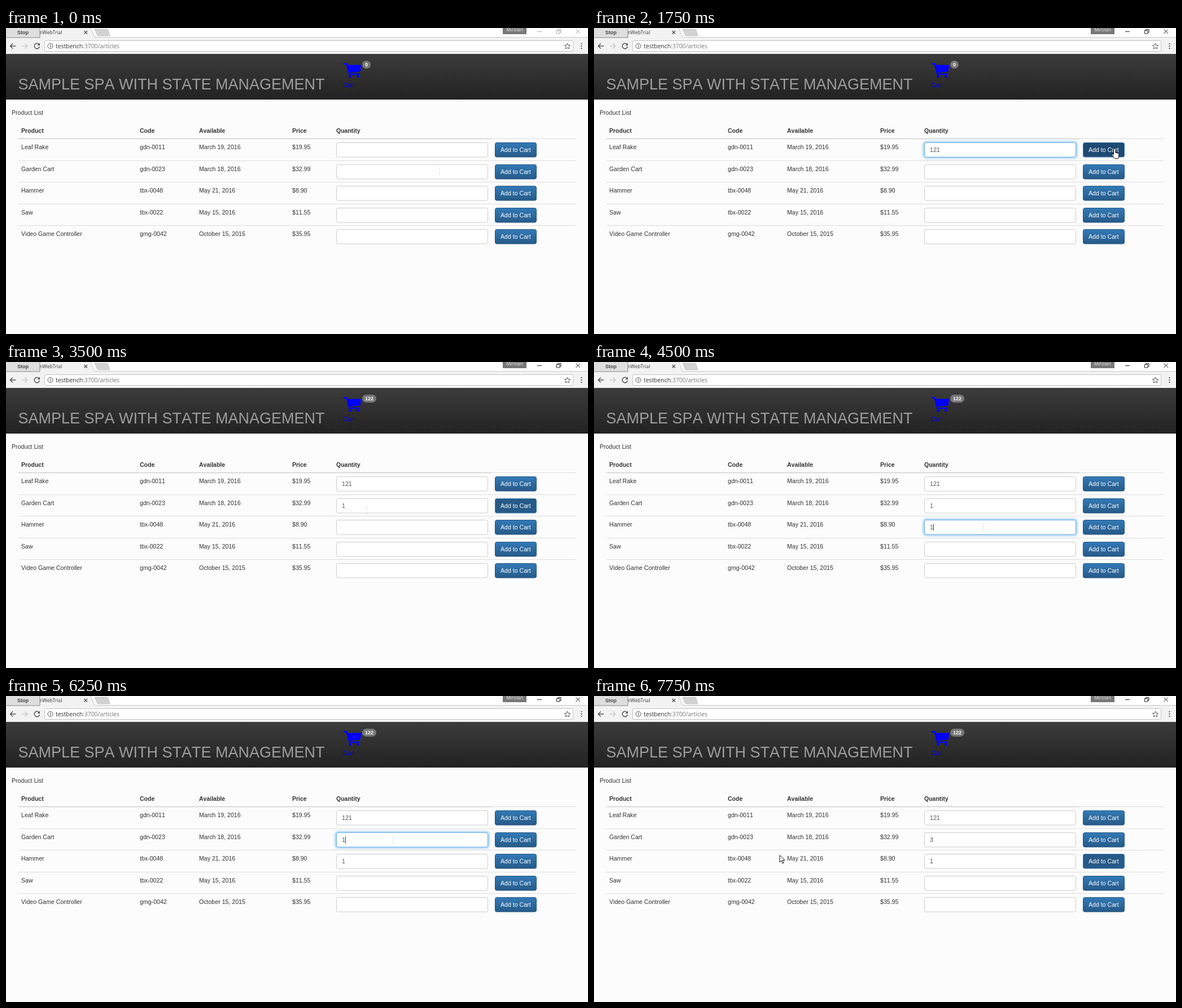
Animation of 1031x543 px, one loop 8 s. Source, as an HTML page:

```html
<!DOCTYPE html>
<html lang="en">
<head>
<meta charset="utf-8">
<title>Product list</title>
<style>
html, body { margin: 0; width: 100%; height: 100%; overflow: hidden; background: #fcfcfc; }
svg { display: block; font: 10.6px "Liberation Sans", Arial, sans-serif; font-kerning: none; fill: #333; }
.ui { font-family: "Open Sans", sans-serif; }
.b { font-weight: bold; font-size: 10.5px; }
.line { fill: none; stroke: #555; stroke-width: 1.5; }
.rule { fill: none; stroke: #ddd; }
</style>
</head>
<body>
<svg width="1031" height="543" viewBox="0 0 1031 543">
  <defs>
    <linearGradient id="bar" x2="0" y2="1"><stop stop-color="#3c3c3c"/><stop offset="1" stop-color="#222"/></linearGradient>
    <linearGradient id="btn" x2="0" y2="1"><stop stop-color="#337ab7"/><stop offset="1" stop-color="#265a88"/></linearGradient>
    <filter id="glow" x="-10%" y="-50%" width="120%" height="200%"><feGaussianBlur stdDeviation="2.2"/></filter>
  </defs>
  <rect width="1031" height="543" fill="#fcfcfc"/>

  <!-- browser window -->
  <g class="ui">
    <rect width="1031" height="17" fill="#fff"/>
    <path d="M0 17H1031V46H0zM60 0H150L158 17H60z" fill="#f2f2f2"/>
    <path d="M150 0L157 16.5H1031" fill="none" stroke="#c8c8c8"/>
    <path d="M157 2H178Q180 2 181 4L184 14H164Q162 14 161 12z" fill="#d2d2d2" stroke="#bbb" stroke-width=".7"/>
    <rect x="-1" y="-1" width="61" height="18" fill="#dedede" stroke="#888"/>
    <text x="20" y="11" class="b" style="font-size:9px;font-family:'Liberation Sans',sans-serif" fill="#444">Stop</text>
    <text x="60" y="11" font-size="8.3">nWebTrial</text>
    <path class="line" d="M138.5 5l5.5 5.5m0-5.5l-5.5 5.5"/>
    <rect x="880" width="42" height="11" fill="#777"/>
    <text x="886" y="6" font-size="8.4" fill="#eee">Mirolan</text>
    <path class="line" d="M17.5 32H7.5m4.5-4.5L7.5 32l4.5 4.5"/>
    <path class="line" d="M28 32H38m-4.5-4.5L38 32l-4.5 4.5" style="stroke:#ccc"/>
    <path class="line" d="M58.5 29A4.7 4.7 0 1 0 59.5 33"/>
    <path d="M60 26.5V31H55.5z" fill="#555"/>
    <rect x="68.5" y="22.5" width="936" height="19" rx="2" fill="#fff" stroke="#c4c4c4"/>
    <circle cx="78.5" cy="32" r="4.5" class="line" style="stroke-width:1"/>
    <path d="M78 29h1.2v1.2h-1.2zm0 2.2h1.2v3.3h-1.2z" fill="#555"/>
    <text x="88" y="36" font-size="10.4">testbench<tspan fill="#777">:3700/articles</tspan></text>
    <path class="line" style="stroke-width:1" d="M994.5 27l1.5 3.4 3.7.4-2.8 2.5.8 3.7-3.2-1.9-3.2 1.9.8-3.7-2.8-2.5 3.7-.4z"/>
    <path d="M1018.5 27h2v2h-2zm0 4h2v2h-2zm0 4h2v2h-2z" fill="#555"/>
  </g>

  <!-- page header -->
  <rect y="46" width="1031" height="81" fill="url(#bar)"/>
  <text x="21.5" y="109" font-size="27" fill="#9d9d9d">SAMPLE SPA WITH STATE MANAGEMENT</text>
  <g fill="#00f">
    <path d="M598 63.5h5.5l5 18.5H626" fill="none" stroke="#00f" stroke-width="2.4"/>
    <path d="M604 65.5h25l-1.5 12-19.5 2z"/>
    <circle cx="609.5" cy="86" r="2.3"/><circle cx="623.5" cy="86" r="2.3"/>
    <text x="597" y="105">Cart</text>
  </g>
  <text x="10" y="153.5">Product List</text>
  <path d="M22 196.5H860" stroke="#d0d0d0" stroke-width="1.4"/>
  <path class="rule" d="M860 196.5H1009"/>
  <g id="grid"></g>
  <g id="live"></g>
</svg>
<script>
const STEP = 250, LOOP = 8000, PITCH = 38.6;
const columns = [27, 237, 342, 507, 585];
const heads = ['Product', 'Code', 'Available', 'Price', 'Quantity'];
const products = [
  ['Leaf Rake', 'gdn-0011', 'March 19, 2016', '$19.95'],
  ['Garden Cart', 'gdn-0023', 'March 18, 2016', '$32.99'],
  ['Hammer', 'tbx-0048', 'May 21, 2016', '$8.90'],
  ['Saw', 'tbx-0022', 'May 15, 2016', '$11.55'],
  ['Video Game Controller', 'gmg-0042', 'October 15, 2015', '$35.95']
];

// time, action, row, field value or cart total
const actions = [
  [250, 'edit', 0, ''], [500, 'edit', 0, '1'], [750, 'edit', 0, '12'], [1000, 'edit', 0, '121'],
  [1750, 'press', 0], [2000, 'done', 0, '121'],
  [2500, 'edit', 1, ''], [2750, 'edit', 1, '1'], [3000, 'press', 1], [3250, 'done', 1, '122'],
  [4000, 'edit', 2, ''], [4500, 'edit', 2, '1'], [5250, 'press', 2], [5500, 'done', 2, '122'],
  [6000, 'edit', 1, '1'], [6500, 'edit', 1, ''], [6750, 'edit', 1, '3'],
  [7500, 'press', 2], [7750, 'done', 2, '122']
];

// pointer path: time, x, y
const route = [
  [0, 768, 254], [250, 760, 218], [1000, 760, 218], [1500, 918, 215], [1750, 922, 214], [2000, 922, 214],
  [2500, 758, 257], [2750, 758, 257], [3000, 903, 252], [3250, 903, 252], [3500, 639, 264],
  [4000, 690, 293], [4500, 690, 293], [5250, 900, 291], [5500, 900, 291], [6000, 680, 256],
  [6500, 690, 256], [7000, 873, 311.5], [7250, 895, 290], [7500, 895, 290], [7750, 329, 282.5]
];

const pointers = {
  beam: '<path d="M-2-6h4M0-6V6M-2 6h4" stroke="#e6e6e6" fill="none"/>',
  hand: '<path d="M-1.5 1.5a1.5 1.5 0 0 1 3 0V7l4.5 1q1.8.5 1.8 2.3v3l-1.3 4.5h-6L-4.2 11.5q-.8-2 1-2l1.7 1.5z" fill="#fff" stroke="#111"/>',
  arrow: '<path d="M0 0V12.5l3-2.8 2 4.8 2-.9-2-4.6h4z" fill="#fff" stroke="#111"/>'
};

const text = (x, y, s, more = '') => `<text x="${x}" y="${y}" ${more}>${s}</text>`;
const box = (x, y, w, h, more) => `<rect x="${x}" y="${y}" width="${w}" height="${h}" ${more}/>`;
const rowTop = row => 203.5 + Math.round(row * PITCH);

function pointerAt(t) {
  const i = route.findIndex(p => p[0] > t);
  if (i < 0) return route[route.length - 1].slice(1);
  const [t0, x0, y0] = route[i - 1], [t1, x1, y1] = route[i];
  const k = (t - t0) / (t1 - t0);
  return [x0 + (x1 - x0) * k, y0 + (y1 - y0) * k];
}

function stateAt(t) {
  const s = { values: ['', '', '', '', ''], total: '0', field: -1, button: -1, pressed: -1, since: 0 };
  for (const [at, action, row, value] of actions) {
    if (at > t) break;
    s.pressed = -1;
    if (action === 'press') s.pressed = row;
    if (action === 'edit') {
      Object.assign(s, { field: row, button: -1, since: at });
      s.values[row] = value;
    }
    if (action === 'done') Object.assign(s, { field: -1, button: row, total: value });
  }
  return s;
}

function drawField(row, s, t) {
  const y = rowTop(row), on = s.field === row, value = s.values[row];
  let out = on ? box(585, y, 269, 25.5, 'rx="3" fill="none" stroke="#66afe9" stroke-width="3" filter="url(#glow)"') : '';
  out += box(585.5, y, 268, 25.5, `rx="3" fill="#fff" stroke="${on ? '#66afe9' : '#ccc'}"`);
  out += text(595, y + 16.5, value, 'fill="#555"');
  if (on && (t - s.since) % 1000 < 500)
    out += box(595 + value.length * 5.9, y + 7, 1, 12, 'fill="#333"');
  return out;
}

function drawButton(row, s, hover) {
  const y = rowTop(row), down = s.pressed === row, focus = s.button === row;
  const fill = down ? '#1d4a72' : hover || focus ? '#265a88' : 'url(#btn)';
  const edge = down || focus ? '#3b78b0' : '#245580';
  return box(866.5, y, 73, 25.5, `rx="3" fill="${fill}" stroke="${edge}"`) +
    text(902.8, y + 16.5, 'Add to Cart', 'fill="#fff" text-anchor="middle"');
}

const windowButtons = color =>
  `<path d="M941 6.5h8M975.5 4.5h5.5V10h-5.5zM977.5 4V2.5H983V8h-1.5M1009.5 2.5l7.5 7.5m0-7.5l-7.5 7.5" fill="none" stroke="${color}"/>`;

function render(t) {
  const s = stateAt(t), [x, y] = pointerAt(t);
  const over = products.findIndex((_, i) => y >= rowTop(i) && y <= rowTop(i) + 25.5);
  const onButton = over >= 0 && x > 866 && x < 940;
  const onField = over >= 0 && x > 585 && x < 854;
  const wide = s.total.length > 1 ? 25 : 15;
  let out = windowButtons(t < STEP ? '#aaa' : '#222');
  out += box(631, 58, wide, 14, 'rx="7" fill="#777"');
  out += text(631 + wide / 2, 68.3, s.total, 'class="b" style="font-size:9px" fill="#fff" text-anchor="middle"');
  products.forEach((_, i) => out += drawField(i, s, t) + drawButton(i, s, onButton && over === i));
  const kind = onButton ? 'hand' : onField ? 'beam' : 'arrow';
  live.innerHTML = out + `<g transform="translate(${x} ${y})">${pointers[kind]}</g>`;
}

const grid = document.getElementById('grid'), live = document.getElementById('live');
grid.innerHTML = heads.map((h, i) => text(columns[i], 186, h, 'class="b"')).join('') +
  products.map((cells, row) => {
    const y = Math.round(row * PITCH);
    const rule = row ? `<path class="rule" d="M22 ${196.5 + y}H1009"/>` : '';
    return rule + cells.map((c, i) => text(columns[i], 215 + y, c)).join('');
  }).join('');

let shown = -1;
const start = performance.now();
function tick(now) {
  const t = Math.floor(Math.max(0, now - start) % LOOP / STEP) * STEP;
  if (t !== shown) render(shown = t);
  requestAnimationFrame(tick);
}
tick(start);
</script>
</body>
</html>
```
